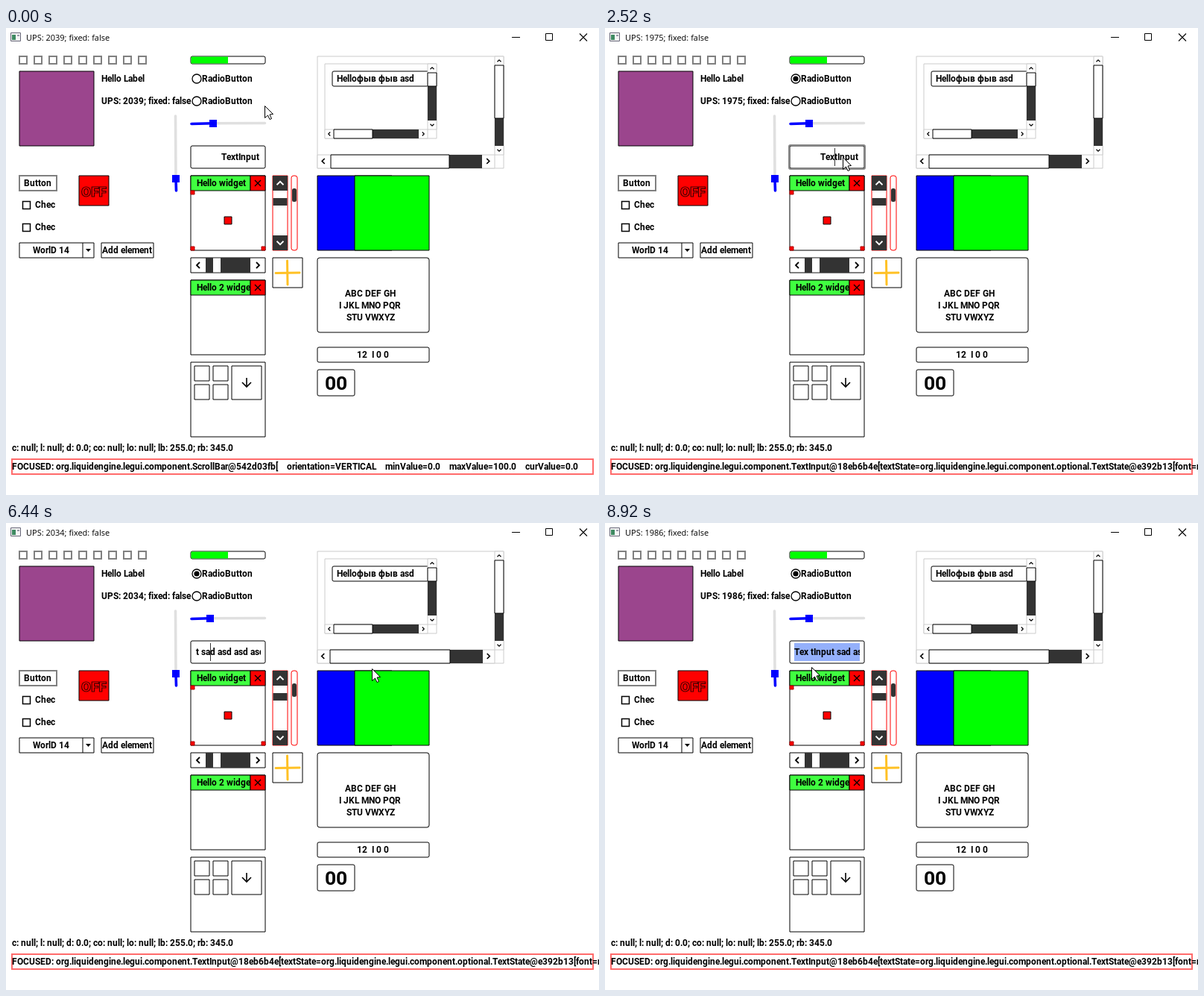
An HTML page with a canvas that plays this animation: 796 by 626 pixels, repeating every 8960 ms.

```html
<!DOCTYPE html>
<html lang="en">
<head>
<meta charset="utf-8">
<title>GUI demo</title>
<style>
html, body { margin: 0; width: 100%; height: 100%; overflow: hidden; background: #fff; }
canvas { display: block; width: 796px; height: 626px; }
</style>
</head>
<body>
<canvas id="stage" width="796" height="626"></canvas>
<script>
const LOOP = 8960, STEP = 40;
const ctx = document.getElementById('stage').getContext('2d');
const UI = '700 11.95px Roboto, sans-serif';
const BIG = '700 26.5px Roboto, sans-serif';
const TITLE = '400 11px "Open Sans", sans-serif';
const DARK = '#333', LINE = '#000', GRAY = '#808080', LIGHT = '#ccc';
const RED = '#f00', GREEN = '#0f0', BLUE = '#00f', HEAD = '#40ff40';

// Timed values: [start, value]
const UPS = [[0, 2039], [520, 2024], [1000, 1996], [1520, 2038], [2040, 1975], [2920, 1962],
  [3480, 1988], [4200, 1881], [4920, 2012], [5720, 1994], [6240, 2034], [7040, 1923], [7880, 1957], [8560, 1986]];
const ARROW_GAP = [[0, 1], [1000, 2], [2480, 0]];
const FOCUS = [
  [0, () => 'ScrollBar@542d03fb[    orientation=VERTICAL    minValue=0.0    maxValue=100.0    curValue=0.0'],
  [520, () => 'RadioButton@6a3c91e2[    checked=true    textState=org.liquidengine.legui.component.optional.TextState@7c1d40a9['],
  [1080, v => `Slider@2b84fa38[    value=${v.toFixed(1)}    orientation=HORIZONTAL    sliderActiveColor=( 0,000E+0  0,000E+0  1,000E+0`],
  [2480, () => 'TextInput@18eb6b4e[textState=org.liquidengine.legui.component.optional.TextState@e392b13[font=null']
];

// Eased tracks: [time, ...values]
const POINTER = [[0, 347, 104], [440, 256, 68], [640, 256, 69], [1040, 280, 127], [1480, 286, 128], [1640, 286, 128],
  [1960, 277, 128], [2120, 277, 128], [2440, 318, 173], [2800, 322, 173], [3320, 347, 176], [3720, 347, 176],
  [4200, 476, 280], [4480, 499, 210], [4600, 491, 195], [6520, 491, 195], [6920, 310, 174], [7040, 310, 174],
  [7320, 357, 180], [7760, 357, 178], [8300, 339, 174], [8840, 277, 193], [8960, 277, 193]];
const SLIDER = [[0, 30], [1160, 30], [1480, 35], [1640, 35], [1960, 26], [8960, 26]];

function at(table, t) {
  let value = table[0][1];
  for (const [start, v] of table) if (t >= start) value = v;
  return value;
}

function track(keys, t) {
  let i = 0;
  while (i < keys.length - 2 && t >= keys[i + 1][0]) i++;
  const a = keys[i], b = keys[i + 1];
  const p = Math.min(1, (t - a[0]) / (b[0] - a[0])), e = p * p * (3 - 2 * p);
  return a.slice(1).map((v, k) => v + (b[k + 1] - v) * e);
}

const ramp = (t, a, b) => Math.max(0, Math.min(1, (t - a) / (b - a)));

function fill(x, y, w, h, color) {
  ctx.fillStyle = color;
  ctx.fillRect(x, y, w, h);
}

// The outline is centred on the edge of the box
function box(x, y, w, h, color, stroke = LINE, r = 0, lw = 1) {
  ctx.beginPath();
  ctx.roundRect(x, y, w, h, r);
  if (color) { ctx.fillStyle = color; ctx.fill(); }
  ctx.strokeStyle = stroke;
  ctx.lineWidth = lw;
  ctx.stroke();
}

function path(color, lw, ...pts) {
  ctx.beginPath();
  for (let i = 0; i < pts.length; i += 2) ctx.lineTo(pts[i], pts[i + 1]);
  ctx.strokeStyle = color;
  ctx.lineWidth = lw;
  ctx.stroke();
}

function disc(x, y, r, color, lw) {
  ctx.beginPath();
  ctx.arc(x, y, r, 0, 7);
  ctx.fillStyle = ctx.strokeStyle = color;
  ctx.lineWidth = lw;
  lw ? ctx.stroke() : ctx.fill();
}

// dx, dy: pointing direction
function chevron(x, y, dx, dy, s, color = '#000', lw = 1.6) {
  path(color, lw, x - dx * s / 2 - dy * s, y - dy * s / 2 - dx * s,
    x + dx * s / 2, y + dy * s / 2,
    x - dx * s / 2 + dy * s, y - dy * s / 2 + dx * s);
}

// The toolkit rounds every glyph advance to whole pixels
const advances = {};
function advance(ch, font = UI) {
  const key = font + ch;
  if (!(key in advances)) {
    ctx.font = font;
    advances[key] = Math.round(ctx.measureText(ch).width);
  }
  return advances[key];
}
const width = s => [...s].reduce((sum, ch) => sum + advance(ch), 0);

function text(s, x, y, font = UI) {
  ctx.fillStyle = '#000';
  for (const ch of s) {
    const w = advance(ch, font);
    ctx.font = font;
    ctx.fillText(ch, x, y);
    x += w;
    if (x > 796) break;
  }
}

function clipped(x, y, w, h, draw) {
  ctx.save();
  ctx.beginPath();
  ctx.rect(x, y, w, h);
  ctx.clip();
  draw();
  ctx.restore();
}

function titleBar(ups) {
  box(6.5, 6.5, 13, 11, '#f4f4f4', '#667');
  fill(8, 9, 5, 7, '#3f8a62');
  fill(15, 9, 3, 2, '#99a');
  ctx.font = TITLE;
  ctx.fillStyle = '#000';
  ctx.fillText(`UPS: ${ups}; fixed: false`, 27, 17);
  path('#000', 1, 679, 12.5, 690, 12.5);
  box(724.5, 7.5, 9, 9, null);
  path('#000', 1.1, 770, 7.5, 780, 17.5);
  path('#000', 1.1, 780, 7.5, 770, 17.5);
}

function leftColumn() {
  for (let i = 0; i < 9; i++) box(18 + 20 * i, 38, 10, 10, '#fff', GRAY, 0, 2);
  box(18, 58, 100, 100, '#9b458d');
  text('Hello Label', 128, 72);

  box(18, 198, 50, 20, '#fff', GRAY, 0, 2);
  text('Button', 24, 212);
  box(98, 198, 40, 40, RED);
  ctx.font = '900 19px Roboto, sans-serif';
  ctx.textAlign = 'center';
  ctx.strokeStyle = '#400';
  ctx.lineWidth = 1.2;
  ctx.strokeText('OFF', 118, 226);
  ctx.textAlign = 'left';
  for (const y of [232, 262]) {
    box(22.5, y + .5, 10, 10, '#fff', LINE, 0, 1.5);
    text('Chec', 39, y + 9);
  }
  box(18, 288, 100, 20, '#fff');
  text('WorlD 14', 36, 302);
  path(LINE, 1, 103, 288, 103, 308);
  ctx.fillStyle = '#000';
  ctx.beginPath();
  ctx.moveTo(107, 296); ctx.lineTo(114, 296); ctx.lineTo(110.5, 300);
  ctx.fill();
  box(128, 288, 70, 20, '#fff');
  text('Add element', 129, 302);
}

function windowPanel(y, title) {
  box(248, y, 100, 100, '#fff');
  box(248, y, 80, 20, HEAD);
  clipped(248, y, 80, 20, () => text(title, 256, y + 14));
  box(328, y, 20, 20, RED);
  path('#000', 1.2, 334, y + 6, 342, y + 14);
  path('#000', 1.2, 342, y + 6, 334, y + 14);
}

function middleColumn(t) {
  box(248, 38, 100, 10, '#fff', LINE, 2);
  fill(248.5, 38.5, 49.5, 9, GREEN);
  for (const y of [68, 98]) {
    disc(256, y, 6, '#000', 1.3);
    text('RadioButton', 263, y + 4);
  }
  if (t >= 520) disc(256, 68, 3.6, '#000');

  windowPanel(198, 'Hello widget');
  for (const [x, y] of [[248, 218], [248, 293], [343, 293]]) box(x, y, 5, 5, RED, '#a00');
  box(293, 253, 10, 10, RED);

  box(358, 198, 20, 100, '#fff', RED);
  for (const [y, d] of [[198, -1], [278, 1]]) {
    fill(358, y, 20, 20, DARK);
    chevron(368, y + 10, 0, d, 4.5, '#fff', 1.8);
  }
  fill(358.5, 228, 19, 10, DARK);
  box(383, 198, 8, 100, '#fff', RED, 3);
  ctx.beginPath();
  ctx.roundRect(384, 215, 6, 18, 2.5);
  ctx.fillStyle = DARK;
  ctx.fill();

  box(248, 308, 100, 20, '#fff');
  fill(268, 308, 60, 20, DARK);
  fill(278, 308.5, 10, 19, '#fff');
  chevron(258, 318, -1, 0, 4, '#000', 1.8);
  chevron(338, 318, 1, 0, 4, '#000', 1.8);

  box(358, 308, 40, 40, '#fff');
  ctx.lineCap = 'round';
  path('#ffc125', 3, 377.5, 312, 378, 344);
  path('#ffc125', 3, 362, 328.5, 394, 328);
  ctx.lineCap = 'butt';

  windowPanel(338, 'Hello 2 widget');

  box(248, 448, 100, 100, '#fff');
  for (const x of [253, 278]) for (const y of [453, 478]) box(x, y, 20, 20, '#fff');
  box(303, 453, 40, 45, '#fff');
  path('#000', 1.6, 323, 469, 323, 481);
  path('#000', 1.6, 317, 475, 323, 481, 329, 475);
}

function sliders(value) {
  const x = 248 + value;
  ctx.lineCap = 'round';
  path('#e0e0e0', 3.6, x, 127.8, 347.5, 127.5);
  path(BLUE, 3.6, 249, 128.5, x, 127.8);
  path('#e0e0e0', 3.6, 227.5, 118, 228, 202);
  path(BLUE, 3.6, 228, 202, 228.5, 218);
  ctx.lineCap = 'butt';
  fill(x - 5, 123, 10, 10, BLUE);
  fill(223, 197, 10, 10, BLUE);
}

function rightColumn(gap) {
  box(418, 38, 250, 150, '#fff', LIGHT);
  box(428, 48, 150, 100, '#fff', LIGHT);
  clipped(428, 48, 138, 88, () => {
    box(438, 58, 150, 20, '#fff', LINE, 2);
    text('Helloфыв фыв asd', 444, 72);
  });
  box(566, 48, 12, 88, '#fff', LIGHT);
  fill(566, 60, 12, 64, DARK);
  box(566, 60, 12, 18, '#fff');
  chevron(572, 54, 0, -1, 2.5, '#000', 1.2);
  chevron(572, 130, 0, 1, 2.5, '#000', 1.2);
  box(428, 136, 138, 12, '#fff', LIGHT);
  fill(440, 136, 114, 12, DARK);
  box(440, 136, 52, 12, '#fff');
  chevron(434, 142, -1, 0, 2.5, '#000', 1.2);
  chevron(560, 142, 1, 0, 2.5, '#000', 1.2);

  box(656, 38, 12, 132, '#fff', LIGHT);
  fill(656, 50, 12, 108, DARK);
  box(656, 50, 12, 71, '#fff');
  chevron(662, 44, 0, -1, 2.5, '#000', 1.2);
  chevron(662, 164, 0, 1, 2.5, '#000', 1.2);
  box(418, 170, 238, 18, '#fff', LIGHT);
  fill(435 + gap, 170, 205 - 2 * gap, 18, DARK);
  box(435 + gap, 170, 161 - 2 * gap, 18, '#fff');
  chevron(425.5 + gap / 2, 178.5, -1, 0, 3.5, '#000', 1.7);
  chevron(647.5 - gap / 2, 178.5, 1, 0, 3.5, '#000', 1.7);

  box(418, 198, 100, 100, BLUE);
  box(468, 198, 100, 100, GREEN);

  box(418, 308, 150, 100, '#fff', LINE, 3);
  text('ABC DEF GH', 455, 360);
  text('I JKL MNO PQR', 447, 376);
  text('STU VWXYZ', 457, 392);
  box(418, 428, 150, 20, '#fff', LINE, 2);
  text('12  I 0 0', 471, 442);
  box(418, 458, 50, 35, '#fff', LINE, 2);
  text('00', 428, 485, BIG);
}

function inputState(t) {
  const extra = ' sad asd asd asd';
  if (t < 2920) return { s: 'TextInput', caret: t < 2480 ? -1 : 3, anchor: -1 };
  const s = 'Tex tInput' + extra.slice(0, Math.floor(16 * ramp(t, 3700, 4560)));
  let caret = t < 3360 ? 4 : s.length, anchor = -1;
  if (t >= 5560) caret = 26 - Math.round(13 * ramp(t, 5560, 6360));
  if (t >= 6960) {
    anchor = 21;
    caret = t < 7760 ? 21 + Math.round(5 * ramp(t, 7040, 7280)) : 26 - Math.round(26 * ramp(t, 7800, 8760));
  }
  return { s, caret, anchor };
}

function textInput(t, mx, my) {
  const hover = mx > 248 && mx < 348 && my > 158 && my < 188;
  box(248, 158, 100, 30, '#fff', LINE, 2);
  if (hover) box(247, 157, 102, 32, null, '#888', 2, 2);
  const { s, caret, anchor } = inputState(t);
  const w = width(s), before = n => width(s.slice(0, n));
  const end = 340 - w;
  const x = w <= 86 ? end : Math.min(254, Math.max(end, 274 - before(caret)));
  clipped(254, 160, 88, 27, () => {
    if (anchor >= 0 && anchor !== caret) {
      const a = x + before(Math.min(anchor, caret)), b = x + before(Math.max(anchor, caret));
      fill(a, 161, b - a + 1, 24, '#94b0fb');
    }
    text(s, x, 177);
    if (caret >= 0 && t % 1000 < 600) fill(x + before(caret), 161, 1, 24, '#333');
  });
}

function pointer(t, x, y) {
  if (t >= 3440 && t < 3640) disc(x + 9, y + 9, 29.5, 'rgba(255, 255, 0, .5)');
  if (t >= 4440 && t < 5040) disc(x + 14, y + 1, 6, '#1f97e8', 4);
  ctx.save();
  ctx.translate(Math.round(x) + .5, Math.round(y) + .5);
  ctx.beginPath();
  for (const [px, py] of [[0, 0], [0, 16], [4, 12.5], [6.5, 18], [9, 17], [6.5, 11.5], [11, 11]]) ctx.lineTo(px, py);
  ctx.closePath();
  ctx.fillStyle = '#fff';
  ctx.fill();
  ctx.strokeStyle = '#000';
  ctx.lineWidth = 1;
  ctx.stroke();
  ctx.restore();
}

function draw(t) {
  const ups = at(UPS, t), [value] = track(SLIDER, t), [mx, my] = track(POINTER, t);
  fill(0, 0, 796, 626, '#fff');
  titleBar(ups);
  leftColumn();
  text(`UPS: ${ups}; fixed: false`, 128, 102);
  middleColumn(t);
  sliders(Math.round(value));
  textInput(t, mx, my);
  rightColumn(at(ARROW_GAP, t));
  text('c: null; l: null; d: 0.0; co: null; lo: null; lb: 255.0; rb: 345.0', 8, 567);
  box(8, 578, 780, 20, '#fff', '#ff6b6b', 0, 2);
  text('FOCUSED: org.liquidengine.legui.component.' + at(FOCUS, t)(Math.round(value)), 8, 592);
  pointer(t, mx, my);
}

const start = performance.now();
function tick() {
  const t = (performance.now() - start) % LOOP;
  draw(Math.floor(t / STEP) * STEP);
  requestAnimationFrame(tick);
}
tick();
</script>
</body>
</html>
```
